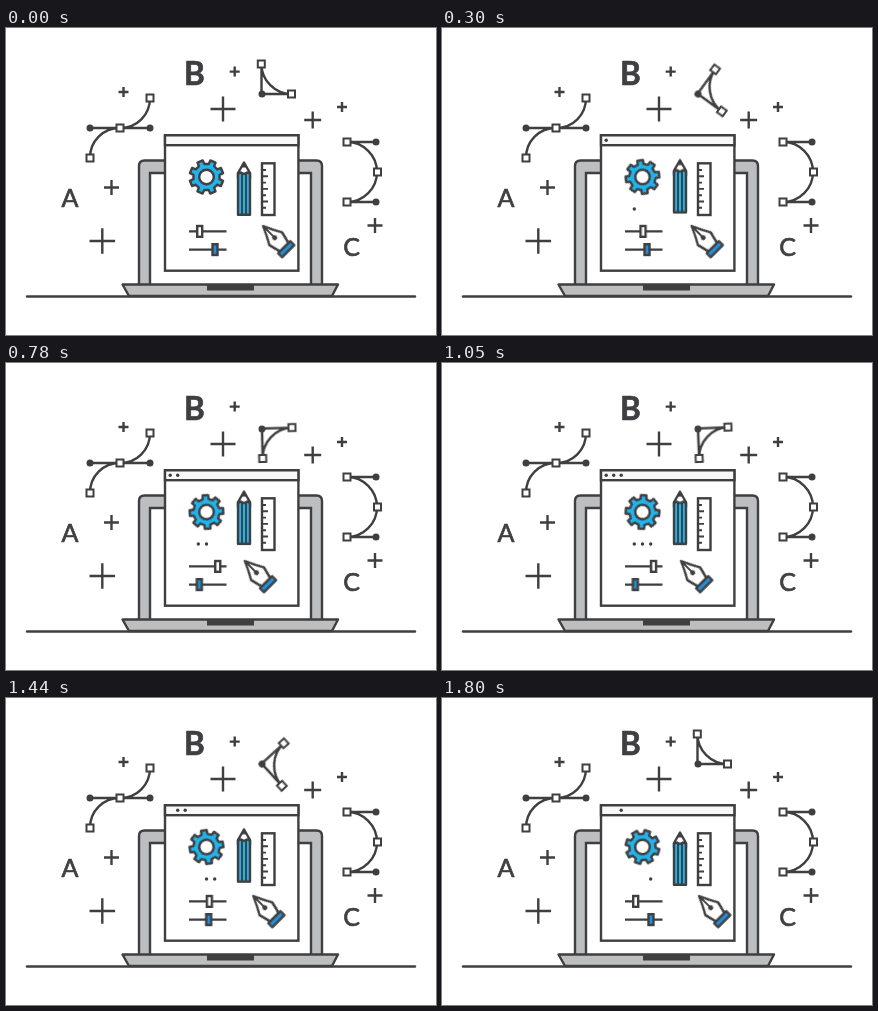
An HTML page that plays this animation: 430 px wide and 307 px high, repeating every 1830 ms.

```html
<!DOCTYPE html>
<html lang="en">
<head>
<meta charset="utf-8">
<title>Design tools</title>
<style>
  html, body { margin: 0; width: 100%; height: 100%; overflow: hidden; background: #fff; }
  svg { display: block; width: 100vw; height: 100vh; }
  :root { --ink: #3f3f41; --blue: #21b3ea; --deep: #238fd6; --loop: 1830ms; }

  .art { fill: none; stroke: var(--ink); stroke-width: 2.4; }
  .white { fill: #fff; }
  .gray { fill: #bdbec0; }
  .bar { fill: #f8f8f8; }
  .blue { fill: var(--blue); }
  .deep { fill: var(--deep); }
  .solid { fill: var(--ink); stroke: none; }
  .knob { fill: #fff; stroke-width: 2; }
  .thin { stroke-width: 1.9; }
  .round { stroke-linejoin: round; }
  text {
    font: 25px Lato, sans-serif; text-anchor: middle;
    fill: var(--ink); stroke-width: .7; stroke-linejoin: round;
  }
  .big { font-size: 31.5px; font-weight: 700; }

  /* Out and back: rest, peak at 900 ms, rest again at 1800 ms */
  .swing { animation: swing var(--loop) infinite; }
  @keyframes swing {
    0% { transform: none; animation-timing-function: cubic-bezier(.33, 0, .36, 1); }
    49.18% { transform: var(--to); animation-timing-function: cubic-bezier(.64, 0, .67, 1); }
    98.36%, 100% { transform: none; }
  }
  .corner { --to: rotate(90deg); transform-origin: 256px 66px; }
  .pencil { --to: translateY(-6px); }
  .top-knob { --to: translateX(18.3px); }
  .pen { --to: translateX(-18.5px); }

  .low-knob { animation: drift 915ms cubic-bezier(.37, 0, .63, 1) infinite alternate; }
  @keyframes drift { to { transform: translateX(-16.5px); } }

  .gear { transform-origin: 200.5px 149px; animation: spin var(--loop) linear infinite; }
  @keyframes spin { to { transform: rotate(360deg); } }

  .dot { animation: blink var(--loop) step-end infinite; }
  .second { animation-delay: -1530ms; }
  .third { animation-delay: -1230ms; }
  @keyframes blink {
    0%, 66.4% { opacity: 0; }
    16.3% { opacity: 1; }
  }
</style>
</head>
<body>
<svg viewBox="0 0 430 307">
  <defs>
    <rect id="node" x="-3.5" y="-3.5" width="7" height="7" class="knob"/>
    <circle id="end" r="3.5" class="solid"/>
  </defs>
  <g class="art">
    <path id="pluses"/>
    <text x="64" y="178.7" stroke="#3f3f41">A</text>
    <text x="188.3" y="56.8" class="big" stroke="#3f3f41">B</text>
    <text x="345.5" y="227.5" stroke="#3f3f41">C</text>

    <!-- Bezier curves -->
    <path d="M84 100H144M84 130C84 113 97 100 114 100S144 87 144 70"/>
    <use href="#end" x="84" y="100"/>
    <use href="#end" x="144" y="100"/>
    <use href="#node" x="84" y="130"/>
    <use href="#node" x="114" y="100"/>
    <use href="#node" x="144" y="70"/>

    <path d="M370 114H341A30 30 0 0 1 341 174H370"/>
    <use href="#end" x="370" y="114"/>
    <use href="#end" x="370" y="174"/>
    <use href="#node" x="341" y="114"/>
    <use href="#node" x="371.5" y="144"/>
    <use href="#node" x="341" y="174"/>

    <g class="swing corner">
      <path d="M255.5 36V66H285.5A30 30 0 0 1 255.5 36"/>
      <use href="#end" x="256" y="66"/>
      <use href="#node" x="255.3" y="36"/>
      <use href="#node" x="285.5" y="66"/>
    </g>

    <!-- Laptop -->
    <path class="gray" d="M133 256V138Q133 132.5 138.5 132.5H310.5Q316 132.5 316 138V256"/>
    <path class="white" d="M144 256V145H305V256"/>
    <path class="gray round" d="M116.5 256.5H332L326 268H123Z"/>
    <rect class="solid" x="201" y="256" width="47" height="6.5"/>
    <path d="M21 268.5H409" stroke-linecap="round"/>

    <!-- Window -->
    <rect class="white" x="159" y="107.3" width="133.4" height="135.4"/>
    <rect class="bar" x="159" y="107.3" width="133.4" height="9.9"/>
    <g class="solid">
      <g class="dot"><circle cx="164.2" cy="112.3" r="1.7"/><circle cx="192.3" cy="181" r="1.7"/></g>
      <g class="dot second"><circle cx="171.7" cy="112.3" r="1.7"/><circle cx="200.5" cy="181" r="1.7"/></g>
      <g class="dot third"><circle cx="179.2" cy="112.3" r="1.7"/><circle cx="208.7" cy="181" r="1.7"/></g>
    </g>

    <g class="gear">
      <path id="cog" class="blue round"/>
      <circle class="white" cx="200.5" cy="149" r="7.3"/>
    </g>

    <g class="swing pencil round">
      <path class="white" d="M232 145L238 134.5L244 145V150H232Z"/>
      <path class="solid" d="M235.2 139.5L238 134L240.8 139.5Z"/>
      <path class="blue" d="M232 145.5L235 144.5L238 146L241 144.5L244 145.5V186.8H232Z"/>
      <path class="thin" d="M236 146V186M240 146V186"/>
    </g>

    <rect class="white" x="256" y="135.3" width="12.5" height="51.7"/>
    <path class="thin" d="M256 142h4M256 148.3h6M256 154.6h4M256 160.9h6M256 167.2h4M256 173.5h6M256 179.8h4"/>

    <path d="M183 203.4H220.5M183 221.6H220.5"/>
    <rect class="white swing top-knob" x="191.2" y="198" width="5" height="10.8"/>
    <rect class="deep low-knob" x="206.5" y="216.2" width="5" height="10.8"/>

    <g class="swing pen">
      <g class="round" transform="translate(257 198) rotate(45)">
        <path class="white" d="M0 0C7 -3 13 -6 18 -9L30 -6V6L18 9C13 6 7 3 0 0Z"/>
        <path class="thin" d="M0 0H16"/>
        <circle class="solid" cx="16.5" cy="0" r="2.5"/>
        <rect class="deep" x="30" y="-8.6" width="5.6" height="17.2"/>
      </g>
    </g>
  </g>
</svg>
<script>
  // Centre x, centre y, arm length
  const pluses = [
    [117.5, 64, 5], [228.7, 43.6, 5], [217, 81, 12.5], [306.7, 92, 8.5],
    [336, 79, 5], [105.5, 159.5, 7.5], [96.3, 213, 12.8], [369, 197.5, 7.5]
  ];
  document.getElementById('pluses').setAttribute('d', pluses.map(([x, y, r]) =>
    `M${x - r} ${y}h${2 * r}M${x} ${y - r}v${2 * r}`).join(''));

  const cogPoint = (deg, r) => {
    const a = deg * Math.PI / 180;
    return `${200.5 + r * Math.cos(a)} ${149 + r * Math.sin(a)}`;
  };
  const teeth = Array.from({ length: 8 }, (_, i) => {
    const mid = 22.5 + i * 45;
    return [[-13, 13.2], [-9.5, 17], [9.5, 17], [13, 13.2]]
      .map(([turn, r]) => cogPoint(mid + turn, r)).join('L');
  });
  document.getElementById('cog').setAttribute('d', `M${teeth.join('L')}Z`);
</script>
</body>
</html>
```
